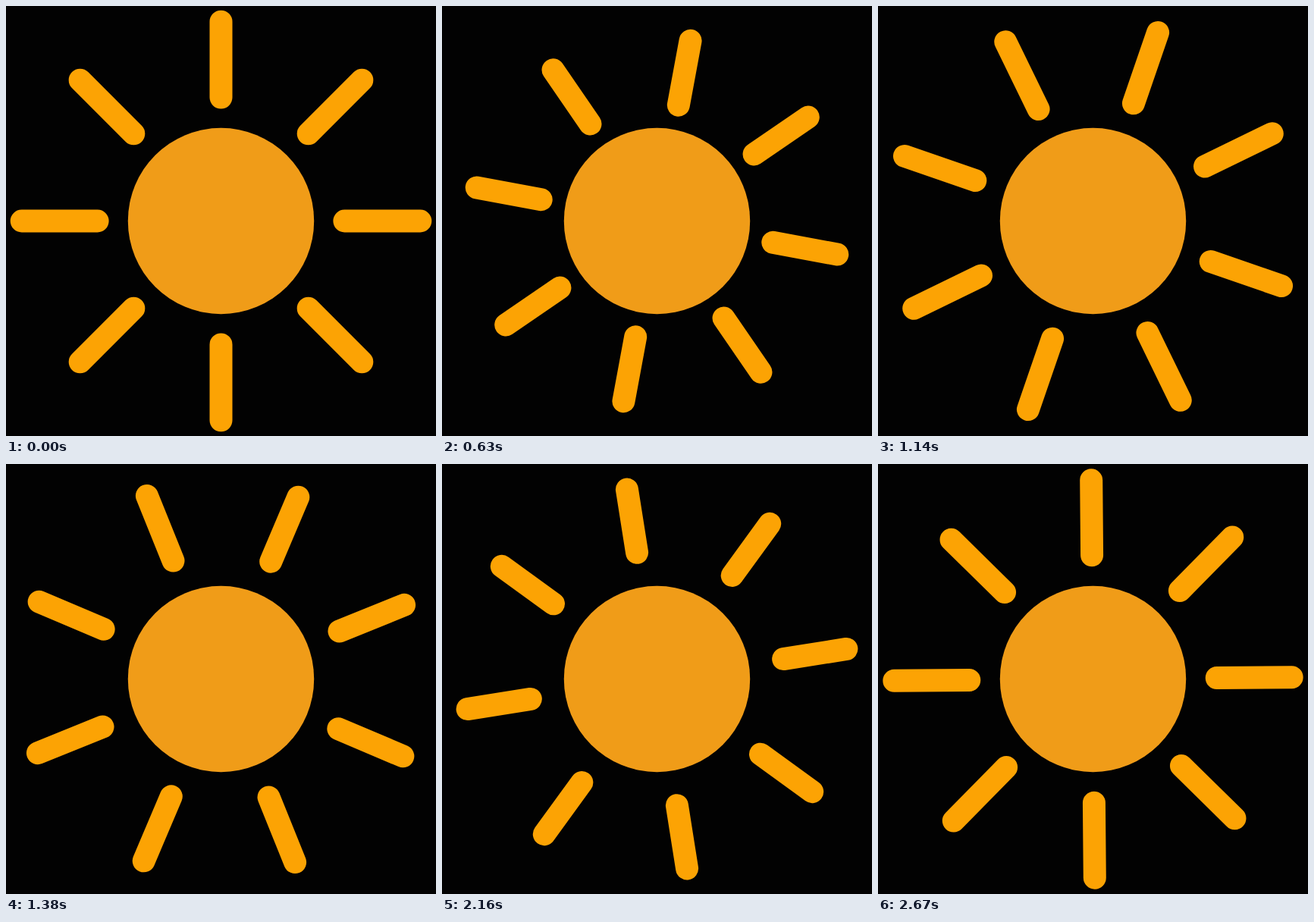
An HTML page that plays this animation: 567x567 px, repeating every 2700 ms.

```html
<!DOCTYPE html>
<html lang="en">
<head>
<meta charset="utf-8">
<title>Sun</title>
<style>
  html, body { margin: 0; width: 100%; height: 100%; overflow: hidden; background: #020202; }
  svg { display: block; width: 100%; height: 100%; }
  #rays { fill: none; stroke: #fca304; stroke-width: 30; stroke-linecap: round; }
</style>
</head>
<body>
<svg viewBox="0 0 567 567">
  <g transform="translate(283.5 283.5)">
    <path id="rays"/>
    <circle r="122.7" fill="#f09c18"/>
  </g>
</svg>
<script>
  const LOOP = 2700, STEP = 30, COUNT = 8;
  const rays = document.getElementById('rays');

  // [time in ms, distance from the centre] of both ray ends
  const INNER = [[0, 162.9], [565, 154.3], [1700, 173.7], [LOOP, 162.9]];
  const OUTER = [[0, 262.8], [565, 239], [1125, 263], [2220, 252.4], [LOOP, 262.8]];

  function valueAt(keys, t) {
    const i = keys.findIndex(key => key[0] > t);
    const [t0, v0] = keys[i - 1], [t1, v1] = keys[i];
    return v0 + (v1 - v0) * (t - t0) / (t1 - t0);
  }

  function draw() {
    const t = Math.floor(performance.now() % LOOP / STEP) * STEP;
    const inner = valueAt(INNER, t), outer = valueAt(OUTER, t);
    let d = '';
    for (let i = 0; i < COUNT; i++) {
      const angle = (i + t / LOOP) * 2 * Math.PI / COUNT;
      const x = Math.sin(angle), y = -Math.cos(angle);
      d += `M${x * inner} ${y * inner}L${x * outer} ${y * outer}`;
    }
    rays.setAttribute('d', d);
    requestAnimationFrame(draw);
  }
  draw();
</script>
</body>
</html>
```
